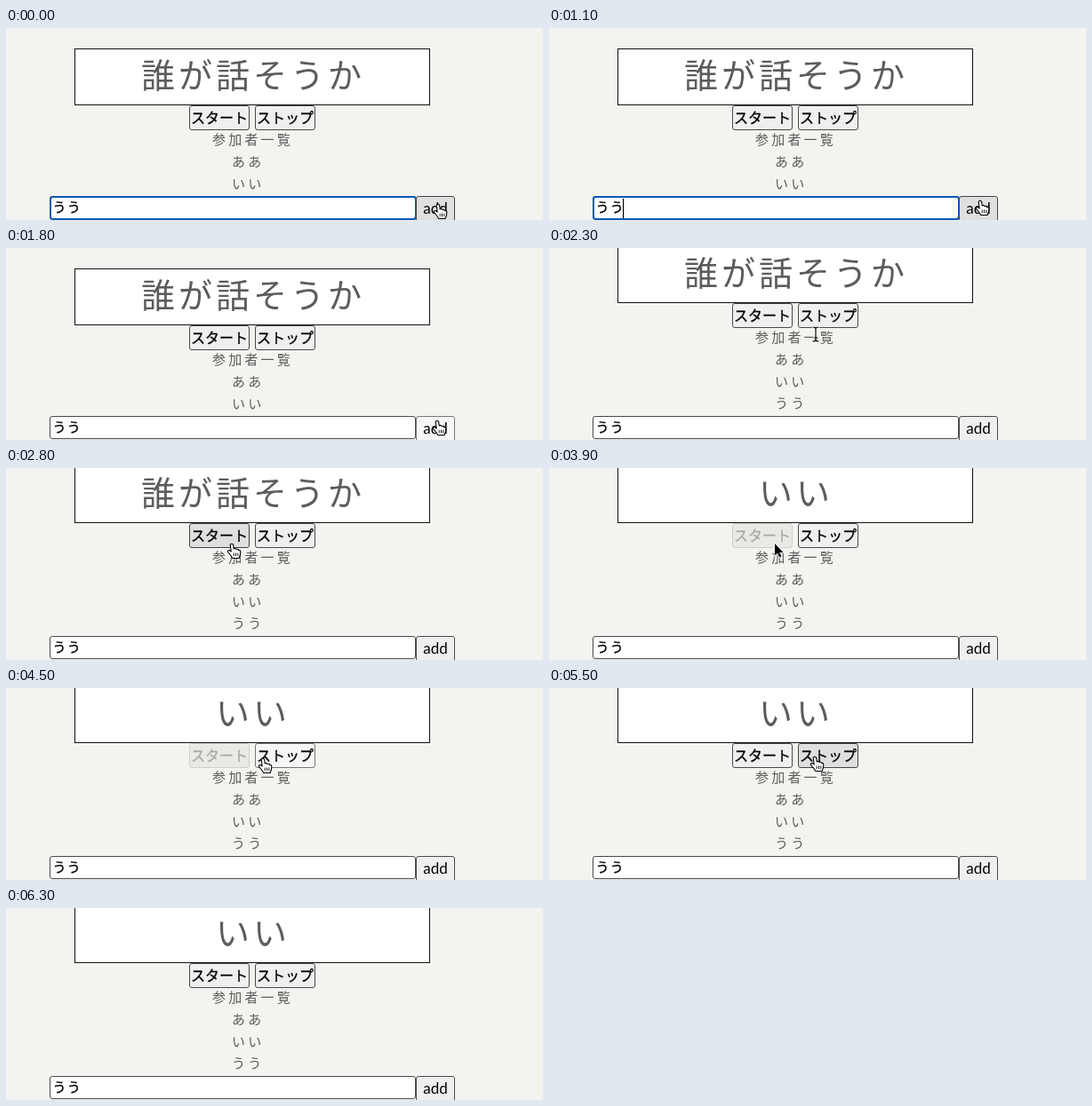
Animation of 604x216 px, one loop 6.9 s. Source, as an HTML page:

```html
<!DOCTYPE html>
<html lang="ja">
<head>
<meta charset="utf-8">
<title>誰が話そうか</title>
<style>
  html, body { margin: 0; width: 100%; height: 100%; overflow: hidden; background: #f3f4ef; }
  svg { display: block; width: 604px; height: 216px; }
  text { font: 16px "Noto Sans CJK JP", "Noto Sans CJK", sans-serif; fill: #000; }
  .ink { stroke: #000; stroke-width: .3; }
  .soft { font-size: 15px; fill: #5c5c5c; letter-spacing: 3.2px; }
  #title { font-size: 38px; letter-spacing: 4px; }
  #value { font-size: 15px; letter-spacing: 1.2px; }
  .latin { font: 17px Lato, sans-serif; }
  .btn rect { fill: #efefef; stroke: #4a4a4a; }
  .btn.hover rect { fill: #dfdfdf; stroke: #444; }
  .btn.active rect { fill: #f6f6f6; stroke: #777; }
  .btn.disabled rect { fill: #e9eae5; stroke: #cfd0cb; }
  .btn.disabled text { fill: #a9a9a6; stroke: #a9a9a6; }
  #field { fill: #fff; stroke: #4c4c4c; }
  #field.hover { stroke: #222; }
  #ring { fill: none; stroke: #0c59b4; stroke-width: 2; }
  .hide { display: none; }
</style>
</head>
<body>
<svg viewBox="0 0 604 216">
  <g id="page">
    <rect x="77.5" y="23.5" width="399" height="63" fill="#fff" stroke="#111"/>
    <text id="title" class="soft" y="66.5"></text>
    <g id="start" class="btn">
      <rect x="206.5" y="87.5" width="67" height="27" rx="2.5"/>
      <text class="ink" x="208" y="106.5">スタート</text>
    </g>
    <g id="stop" class="btn">
      <rect x="280.5" y="87.5" width="67" height="27" rx="2.5"/>
      <text class="ink" x="282" y="106.5">ストップ</text>
    </g>
    <text class="soft" x="232" y="131.3">参加者一覧</text>
    <text class="soft" x="254" y="156">ああ</text>
    <text class="soft" x="254" y="180.7">いい</text>
    <text id="added" class="soft" x="254" y="205.4">うう</text>
  </g>
  <rect id="field" x="49.5" y="189.5" width="411" height="25" rx="2.5"/>
  <rect id="ring" x="50" y="190" width="411" height="25" rx="2.5"/>
  <text id="value" class="ink" x="52.5" y="207.3">うう</text>
  <rect id="caret" x="83" y="192" width="1.2" height="22"/>
  <g id="add" class="btn">
    <rect x="461.5" y="189.5" width="43" height="28" rx="2.5"/>
    <text class="latin" x="483" y="208.5" text-anchor="middle">add</text>
  </g>
  <g id="cursor">
    <g id="hand" fill="#fff" stroke="#000" stroke-width="1.1" stroke-linejoin="round">
      <path d="M-1.8 1.4Q0-1 1.6 1.4L2.2 6Q4.2 4.6 5 6.6Q7 5.6 7.6 7.6Q9.6 7 9.8 9.4L9.4 13L8 16.5H.8L-1.5 13L-4.6 9.3Q-5 7.2-2.4 7.8L-.8 9Z"/>
      <path d="M2.2 10.5v3.5M4.5 10.5v3.5M6.8 10.5v3.5" stroke-width=".9"/>
    </g>
    <path id="arrow" d="M0 0V13.5L3 10.8L5.2 15.6L7.4 14.6L5.2 10H9.5Z" stroke="#fff" stroke-width="1.4" paint-order="stroke"/>
    <g id="beam" fill="none" stroke-linecap="round">
      <path d="M-3-8Q0-8 0-6V6Q0 8-3 8M3-8Q0-8 0-6M0 6Q0 8 3 8M-2 4H2" stroke="#fff" stroke-width="2.6"/>
      <path d="M-3-8Q0-8 0-6V6Q0 8-3 8M3-8Q0-8 0-6M0 6Q0 8 3 8M-2 4H2" stroke="#000" stroke-width="1.2"/>
    </g>
  </g>
</svg>
<script>
  const LOOP = 6900, TICK = 100, SCROLL = 25;
  const NAMES = ['ああ', 'いい', 'うう'];

  // pointer path: time, x, y
  const PATH = [
    [0, 486, 198], [300, 490, 191], [500, 490, 191], [700, 494, 190],
    [1100, 485, 194], [2000, 485, 194], [2100, 460, 182], [2300, 300, 97],
    [2500, 267, 89], [2700, 257, 88], [2800, 254, 85], [4000, 254, 85],
    [4300, 283, 81], [4400, 289, 79], [5400, 289, 79], [5500, 299, 77],
    [5700, 311, 77], [6000, 311, 77], [6100, 321, 125], [6200, 334, 203], [6300, 340, 250]
  ];

  const $ = id => document.getElementById(id);
  const within = (t, a, b) => t >= a && t < b;
  const inBox = (p, l, t, r, b) => p.x >= l && p.x <= r && p.y >= t && p.y <= b;
  const show = (id, on) => $(id).classList.toggle('hide', !on);

  function pointer(t) {
    const i = PATH.findIndex(k => k[0] > t);
    if (i < 0) return { x: 340, y: 250 };
    const [t0, x0, y0] = PATH[i - 1], [t1, x1, y1] = PATH[i];
    const k = (t - t0) / (t1 - t0);
    return { x: x0 + (x1 - x0) * k, y: y0 + (y1 - y0) * k };
  }

  function setTitle(t) {
    const text = t < 3300 ? '誰が話そうか'
      : NAMES[(Math.min(t, 4800) / TICK - 32) % NAMES.length];
    $('title').textContent = text;
    $('title').setAttribute('x', 278 - text.length * 21);
  }

  function setButton(id, over, pressed, disabled) {
    const state = disabled ? 'disabled' : pressed ? 'active' : over ? 'hover' : '';
    $(id).setAttribute('class', 'btn ' + state);
    return over && !disabled;
  }

  function render(ms) {
    const t = Math.floor(ms / TICK) * TICK;
    const p = pointer(t);
    const shift = t >= 1900 ? SCROLL : 0;

    $('page').setAttribute('transform', `translate(0 ${-shift})`);
    show('added', t >= 1900);
    show('ring', t < 1800);
    show('caret', within(t, 100, 600) || within(t, 1100, 1600));
    setTitle(t);

    const top = 87 - shift;
    const onButton = [
      setButton('start', inBox(p, 206, top, 274, top + 28), within(t, 3100, 3300), within(t, 3300, 4800)),
      setButton('stop', inBox(p, 280, top, 348, top + 28), within(t, 4400, 4800), false),
      setButton('add', inBox(p, 461, 189, 505, 216), t === 1800, false)
    ].some(Boolean);

    const onField = inBox(p, 49, 189, 461, 216);
    $('field').setAttribute('class', onField ? 'hover' : '');
    const onText = onField || inBox(p, 232, 118 - shift, 322, 135 - shift);

    show('hand', onButton);
    show('beam', !onButton && onText);
    show('arrow', !onButton && !onText);
    $('cursor').setAttribute('transform', `translate(${p.x} ${p.y})`);
  }

  const begin = performance.now();
  function loop() {
    render((performance.now() - begin) % LOOP);
    requestAnimationFrame(loop);
  }
  loop();
</script>
</body>
</html>
```
